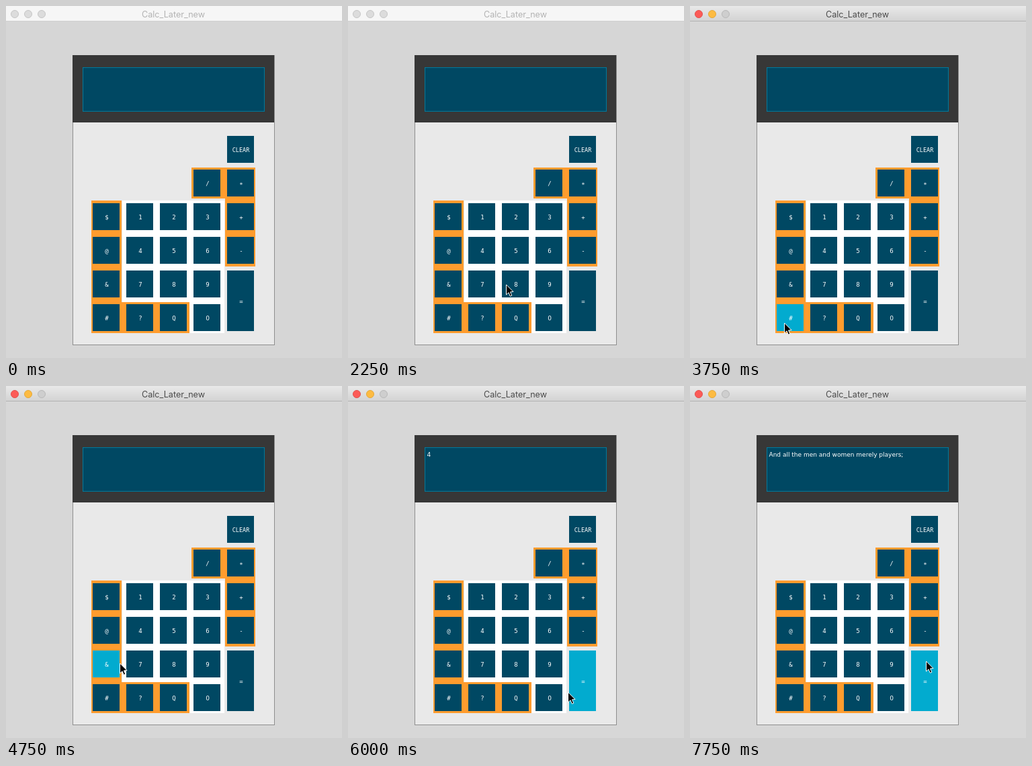
Write an HTML page with a canvas that moves like this. It is 500 by 523 pixels and loops after 8000 ms.

```html
<!DOCTYPE html>
<html lang="en">
<head>
<meta charset="utf-8">
<title>Calculator</title>
<style>
  html, body { margin: 0; width: 100%; height: 100%; overflow: hidden; background: #d6d6d6; }
  canvas { display: block; }
</style>
</head>
<body>
<canvas id="stage" width="500" height="523"></canvas>
<script>
const ctx = document.getElementById('stage').getContext('2d');
const LOOP = 8000, STEP = 250;
const NAVY = '#004863', CYAN = '#02abcf', ORANGE = '#ff9c2e', WHITE = '#ffffff';
const MONO = '"DejaVu Sans Mono", monospace';
const SANS = '"DejaVu Sans", sans-serif';

// Columns start at x = 129, rows at y = 193, both 50px apart.
const KEY_ROWS = ['    C', '   /*', '$123+', '@456-', '&789=', '#?Q0 '];

// Where the pointer arrives and when; a glide eases in over that many ms, otherwise it jumps.
const STOPS = [
  { at: 500, x: 477, y: 335 },
  { at: 750, x: 346, y: 414 },
  { at: 1500, x: 235, y: 413, glide: 750 },
  { at: 2500, x: 257, y: 393 },
  { at: 3250, x: 133, y: 476, glide: 500 },
  { at: 3750, x: 140, y: 470 },
  { at: 4750, x: 169, y: 411 },
  { at: 5000, x: 194, y: 377 },
  { at: 6000, x: 327, y: 454 },
  { at: 6250, x: 337, y: 454 },
  { at: 7750, x: 351, y: 408, glide: 500 }
];
const HOVER = [{ at: 3250, key: '#' }, { at: 4750, key: '&' }, { at: 5000, key: '4' }, { at: 6000, key: '=' }];
const OUTPUT = [{ at: 5500, line: '4' }, { at: 6750, line: 'And all the men and women merely players;' }];

const latest = (list, t) => list.filter(item => item.at <= t).pop();
const easeOut = u => 1 - (1 - u) ** 2;

function pointerAt(t) {
  const from = latest(STOPS, t);
  const to = STOPS.find(stop => stop.at > t);
  if (!from || !to || !to.glide) return from;
  const u = easeOut(Math.max(0, 1 - (to.at - t) / to.glide));
  const mix = (a, b) => Math.round(a + (b - a) * u);
  return { x: mix(from.x, to.x), y: mix(from.y, to.y) };
}

function rect(x, y, w, h, color) {
  ctx.fillStyle = color;
  ctx.fillRect(x, y, w, h);
}

function frame(x, y, w, h, color) {
  ctx.strokeStyle = color;
  ctx.lineWidth = 1;
  ctx.strokeRect(x + .5, y + .5, w - 1, h - 1);
}

function text(str, x, y, font, color, align = 'center') {
  ctx.font = font;
  ctx.fillStyle = color;
  ctx.textAlign = align;
  ctx.fillText(str, x, y);
}

function drawTitleBar(active) {
  let bar = '#f6f6f6';
  if (active) {
    bar = ctx.createLinearGradient(0, 0, 0, 22);
    bar.addColorStop(0, '#e9e9e9');
    bar.addColorStop(1, '#d3d3d3');
  }
  rect(0, 0, 500, 22, bar);
  rect(0, 22, 500, 1, active ? '#b3b3b3' : '#d0d0d0');

  const lights = active ? ['#fc5b57', '#fdbb41', '#cecece'] : Array(3).fill('#dcdcdc');
  lights.forEach((color, i) => {
    ctx.beginPath();
    ctx.arc(13 + 20 * i, 12, 5.5, 0, Math.PI * 2);
    ctx.fillStyle = color;
    ctx.fill();
    ctx.lineWidth = 1;
    ctx.strokeStyle = color;
    ctx.stroke();
    ctx.strokeStyle = 'rgba(0, 0, 0, .1)';
    ctx.stroke();
  });
  text('Calc_Later_new', 249, 17, '12.6px Inter, sans-serif', active ? '#4a4a4a' : '#b3b3b3');
}

function drawCase() {
  rect(99, 73, 301, 431, '#e9e9e9');
  frame(99, 73, 301, 431, '#8e8e8e');
  rect(99, 73, 300, 100, '#373737');
  rect(114, 91, 271, 66, NAVY);
  frame(114, 91, 271, 66, '#007899');

  rect(173, 289, 152, 197, WHITE);
  rect(127, 289, 45, 197, ORANGE);
  rect(127, 440, 146, 46, ORANGE);
  rect(276, 240, 95, 46, ORANGE);
  rect(326, 240, 45, 147, ORANGE);
}

function drawKey(key, x, y, hot) {
  const h = key === '=' ? 90 : 40;
  rect(x, y, 40, h, hot ? CYAN : NAVY);
  const base = y + h / 2 + (key === '*' ? 6 : 4);
  if (key === 'C') text('CLEAR', x + 20.5, base, '8.5px ' + MONO, WHITE);
  else text(key, x + 21, base, '9px ' + (key === '0' ? SANS : MONO), WHITE);
}

function drawKeys(hot) {
  KEY_ROWS.forEach((row, r) => [...row].forEach((key, c) => {
    if (key !== ' ') drawKey(key, 129 + 50 * c, 193 + 50 * r, key === hot);
  }));
}

function drawPointer({ x, y }) {
  ctx.save();
  ctx.translate(x, y);
  ctx.fillStyle = '#000000';
  ctx.strokeStyle = WHITE;
  ctx.lineWidth = 1;
  const arrow = new Path2D('M.5 1V16L4 12.8 6.3 18.2 8.8 17.2 6.5 11.9 11 11.5Z');
  ctx.fill(arrow);
  ctx.stroke(arrow);
  ctx.restore();
}

function draw(t) {
  const active = t >= 2500;
  rect(0, 0, 500, 523, active ? '#d7d7d7' : '#d6d6d6');
  drawTitleBar(active);
  drawCase();
  drawKeys(latest(HOVER, t)?.key);

  const output = latest(OUTPUT, t);
  if (output) text(output.line, 117.5, 105, '9px ' + SANS, WHITE, 'left');

  const pointer = pointerAt(t);
  if (pointer) drawPointer(pointer);
}

// The screen refreshes only four times a second.
const start = performance.now();
function tick() {
  const t = (performance.now() - start) % LOOP;
  draw(Math.floor(t / STEP) * STEP);
  requestAnimationFrame(tick);
}
tick();
</script>
</body>
</html>
```
